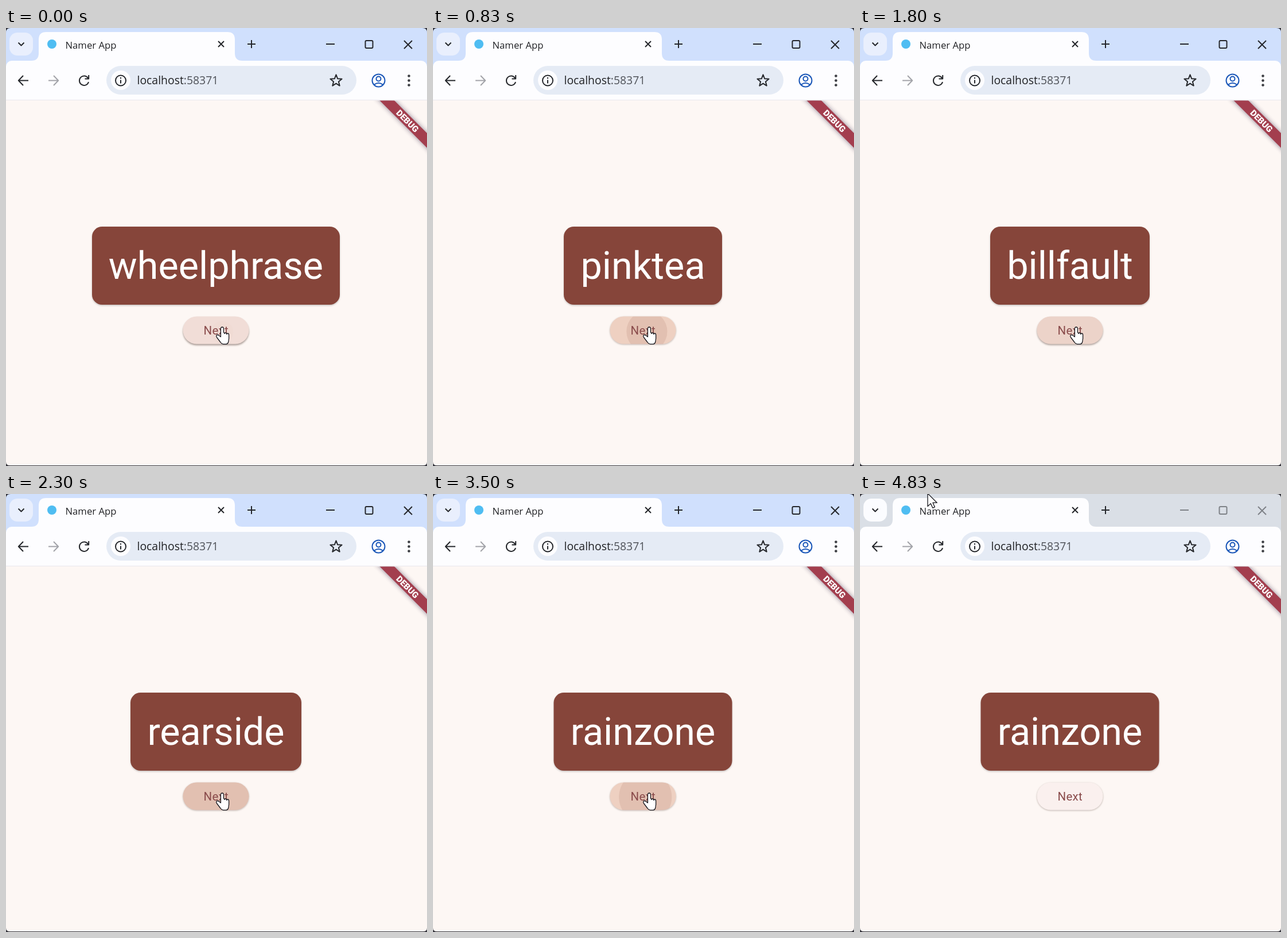
An HTML page that plays this animation: 734x763 px, repeating every 4.86 s.

```html
<!DOCTYPE html>
<html lang="en">
<head>
<meta charset="utf-8">
<title>Namer App</title>
<style>
  html, body { margin: 0; width: 100%; height: 100%; overflow: hidden; background: #34343c; }
  svg { display: block; width: 100%; height: 100%; }
  .ui { font-family: "Open Sans", "Noto Sans", sans-serif; fill: #202124; }
  .app { font-family: Roboto, sans-serif; text-anchor: middle; }
  .line { fill: none; stroke: #25272b; stroke-width: 2; stroke-linejoin: round; }
  .cursor { fill: #fff; stroke: #16161c; stroke-width: 1.3; stroke-linejoin: round; }
</style>
</head>
<body>
<svg viewBox="0 0 734 763">
  <defs>
    <clipPath id="window"><path d="M0 8Q0 0 8 0H726Q734 0 734 8V756Q734 762 727 762H7Q0 762 0 756Z"/></clipPath>
    <clipPath id="page"><rect y="126.5" width="734" height="636"/></clipPath>
    <clipPath id="pill"><rect x="308.5" y="502.5" width="115" height="48" rx="24"/></clipPath>
    <filter id="soft" x="-20%" y="-40%" width="140%" height="180%"><feGaussianBlur stdDeviation="1.4"/></filter>
    <filter id="glow" x="-20%" y="-80%" width="140%" height="260%"><feGaussianBlur stdDeviation="4"/></filter>
  </defs>

  <g clip-path="url(#window)">
    <rect id="titleBar" width="734" height="80"/>
    <rect y="57" width="734" height="90" rx="10" fill="#fdfdff"/>
    <rect y="126" width="734" height="637" fill="#fdf7f4"/>
    <path d="M0 125.5H734" stroke="#e9e7ee"/>

    <!-- tab strip -->
    <path d="M44 57Q57 57 57 44V20Q57 7 70 7H386Q399 7 399 20V44Q399 57 412 57Z" fill="#fdfdff"/>
    <rect id="tabSearch" x="6" y="8" width="41" height="40" rx="14"/>
    <path class="line" d="M21.5 25.5L26.5 30.5L31.5 25.5"/>
    <circle cx="80" cy="28" r="8" fill="#4fbdf2"/>
    <text class="ui" x="103.5" y="35.5" font-size="16.7">Namer App</text>
    <path class="line" d="M370 23L380 33M380 23L370 33"/>
    <path class="line" d="M421 28H435M428 21V35"/>
    <g id="windowButtons">
      <path class="line" d="M558 28H573"/>
      <rect class="line" x="626.5" y="22" width="13" height="13" rx="2"/>
      <path class="line" d="M694 22L708 36M708 22L694 36"/>
    </g>

    <!-- toolbar -->
    <path class="line" d="M39 91.5H22M30 83L21.8 91.5L30 100"/>
    <path class="line" d="M74 91.5H91M83 83L91.2 91.5L83 100" style="stroke:#a3a4a9"/>
    <path class="line" d="M143.2 87.5A8.2 8.2 0 1 0 144 94M144.2 82V88.5H137.5"/>
    <rect x="175" y="66" width="436" height="50" rx="25" fill="#e5ebf5"/>
    <circle cx="200" cy="91" r="17" fill="#fdfdff"/>
    <circle class="line" cx="200" cy="91.5" r="9"/>
    <path class="line" d="M200 90.5V96.5M200 86V88.3"/>
    <text class="ui" x="228.5" y="98" font-size="19.4">localhost<tspan fill="#50535a">:58371</tspan></text>
    <polygon id="star" class="line"/>
    <g class="line" style="stroke:#1b57b8">
      <circle cx="649.5" cy="91.5" r="11"/>
      <circle cx="649.5" cy="88.5" r="4"/>
      <path d="M641.5 99Q649.5 92.5 657.5 99"/>
    </g>
    <g fill="#3c3e43">
      <circle cx="702.5" cy="83.5" r="2.3"/><circle cx="702.5" cy="91.5" r="2.3"/><circle cx="702.5" cy="99.5" r="2.3"/>
    </g>

    <!-- corner ribbon -->
    <g clip-path="url(#page)">
      <g transform="translate(700 162) rotate(45)">
        <rect x="-80" y="-9" width="160" height="18" fill="#302040" opacity=".55" filter="url(#glow)"/>
        <rect x="-80" y="-9" width="160" height="18" fill="#a33e4e"/>
        <text class="app" y="5.3" font-size="15" font-weight="900" fill="#fff">DEBUG</text>
      </g>
    </g>

    <!-- word card -->
    <rect id="cardShadow" y="347.5" height="136" rx="17.6" fill="#000" opacity=".22" filter="url(#soft)"/>
    <rect id="card" y="346" height="136" rx="17.6" fill="#86453a"/>
    <text id="word" class="app" x="366" y="437" font-size="66.5" fill="#fff"></text>

    <!-- button -->
    <rect id="pillShadow" x="308.5" width="115" height="48" rx="24" fill="#301810" filter="url(#soft)"/>
    <g clip-path="url(#pill)">
      <rect id="pillFace" x="308" y="502" width="116" height="49"/>
      <circle id="ripple" fill="#8f4c38"/>
    </g>
    <text class="app" x="366.3" y="534" font-size="20.5" letter-spacing=".3" fill="#894a4a">Next</text>
  </g>

  <path id="hand" class="cursor" d="M0 0Q-2.6 0-2.6 3V17L-5.8 14.4Q-8.4 12.6-10 14.4Q-11 16-9.4 18L-3 26.5Q-1 29.6 1.5 29.6H7Q10 29.2 10.8 25.5L11.6 20V13.5Q11.4 11 9.6 11Q8 11 7.8 12.5Q7.6 10 5.6 10Q4 10 3.8 11.5Q3.4 9.4 2.4 9.2V3Q2.4 0 0 0Z"/>
  <path id="arrow" class="cursor" d="M0 0V22.5L5.2 17.6L8.8 25.3L12.4 23.7L9 16.2H16.3Z"/>
</svg>

<script>
const LOOP = 4860;
// Steady clicking: time of the first release, spacing, count and hold time.
const FIRST = 164, PERIOD = 658, CLICKS = 6, HOLD = 170;
const FADE_END = 375, FADE = 150;
const MOVE = { start: 3620, duration: 627, from: [377, 521], to: [118, -1] };
const LEAVE = MOVE.start + 12;   // pointer crosses the button's edge
const BLUR = MOVE.start + MOVE.duration;   // window loses focus
const words = [
  { click: -1, text: "wheelphrase", width: 432 },
  { click: 0, text: "pinktea", width: 276 },
  { click: 2, text: "billfault", width: 278 },
  { click: 3, text: "rearside", width: 298 },
  { click: 5, text: "rainzone", width: 311 },
];

const el = id => document.getElementById(id);
const clamp = v => Math.min(1, Math.max(0, v));
const mix = (a, b, k) => a + (b - a) * k;
const mixColor = (a, b, k) => a.map((v, i) => mix(v, b[i], k));
const easeOut = k => 1 - (1 - k) ** 2;
const lastClick = t => Math.min(CLICKS - 1, Math.floor((t - FIRST) / PERIOD));
const set = (id, attrs) => {
  for (const name in attrs) el(id).setAttribute(name, attrs[name]);
};

set("star", {
  points: Array.from({ length: 10 }, (_, i) => {
    const r = i % 2 ? 4.6 : 10.6, a = i * Math.PI / 5;
    return [575.5 + r * Math.sin(a), 92 - r * Math.cos(a)];
  }).join(" "),
});

function drawWord(t) {
  const { text, width } = words.findLast(w => lastClick(t) >= w.click);
  const x = 366 - width / 2;
  if (el("word").textContent !== text) el("word").textContent = text;
  set("card", { x, width });
  set("cardShadow", { x, width });
}

function drawButton(t) {
  const released = t - FIRST - lastClick(t + HOLD) * PERIOD;
  const held = released + HOLD;
  const pressed = clamp(held / 75) * clamp((FADE_END - released) / FADE);
  const hover = 1 - clamp((t - LEAVE) / 200);
  // The ripple spreads slowly while held and quickly once released.
  const grow = easeOut(clamp(Math.min(held, HOLD) / 1000 + Math.max(0, released) / 225));
  const rest = mixColor([250, 240, 238], [241, 222, 217], hover);

  set("pillFace", { fill: `rgb(${mixColor(rest, [238, 208, 193], pressed).map(Math.round)})` });
  set("ripple", {
    cx: mix(377, 366, grow), cy: mix(530, 526.5, grow),
    r: mix(19, 63, grow), opacity: 0.12 * pressed,
  });
  const lift = hover * (1 - pressed);
  set("pillShadow", { y: mix(503.5, 505, lift), opacity: mix(0.3, 0.42, lift) });
}

function drawWindow(t) {
  const active = t < BLUR;
  set("titleBar", { fill: active ? "#d0e0fd" : "#dadfe6" });
  set("tabSearch", { fill: active ? "#e9effd" : "#fbfcff" });
  set("windowButtons", { opacity: active ? 1 : 0.5 });
}

function drawCursor(t) {
  const k = easeOut(clamp((t - MOVE.start) / MOVE.duration));
  const transform = `translate(${mixColor(MOVE.from, MOVE.to, k)})`;
  set("hand", { transform, opacity: t < LEAVE ? 1 : 0 });
  set("arrow", { transform, opacity: t < LEAVE ? 0 : 1 });
}

function frame() {
  const t = performance.now() % LOOP;
  drawWord(t);
  drawButton(t);
  drawWindow(t);
  drawCursor(t);
  requestAnimationFrame(frame);
}
frame();
</script>
</body>
</html>
```
